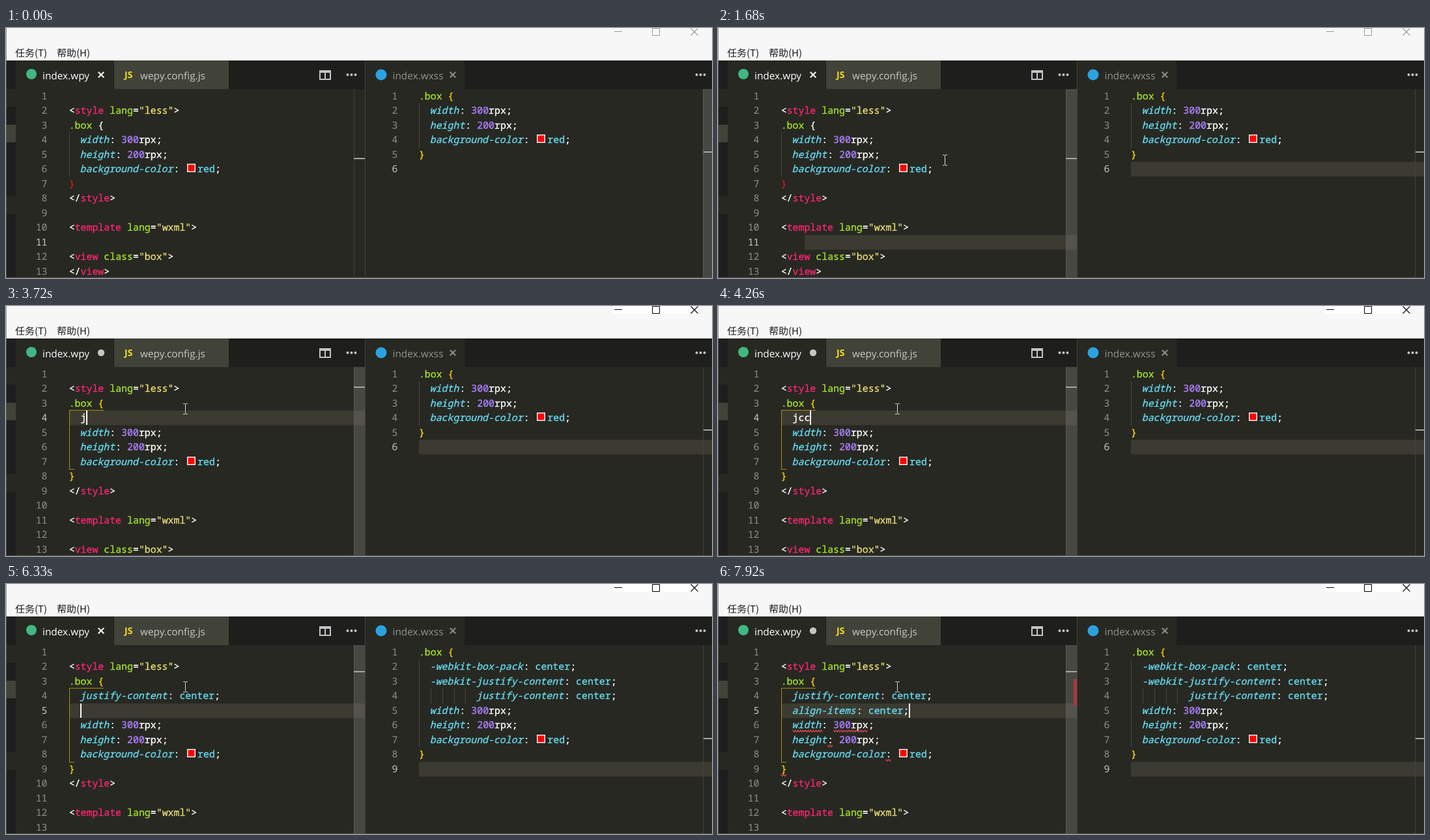
Animation, 1084 px wide and 385 px high, one loop 8 s. Source, as an HTML page with a canvas:

```html
<!DOCTYPE html>
<html lang="zh">
<head>
<meta charset="utf-8">
<title>Editor</title>
<style>
html, body { margin: 0; height: 100%; overflow: hidden; background: #272822; }
canvas { display: block; }
</style>
</head>
<body>
<canvas id="stage" width="1084" height="385"></canvas>
<script>
const ctx = document.getElementById('stage').getContext('2d');
const LOOP = 8000, TOP = 94, ROW = 22.5, CHAR = 8.934;
const LEFT = 96.7, RIGHT = 633.9;
const MONO = '14.89px "Noto Sans Mono", monospace';
const UI = '15.4px "Open Sans", "Noto Sans", sans-serif';
const MENU = '15px "Noto Sans CJK SC", "Noto Sans CJK", sans-serif';
const C = {
  bg: '#272822', bar: '#1e1f1c', raised: '#414339', line: '#3c3b31',
  white: '#ffffff', pink: '#f92672', green: '#a6e22e', str: '#e6db74',
  cyan: '#66d9ef', num: '#ae81ff', gold: '#ffd700', red: '#e01b1b',
  dim: '#90908a', lit: '#c8c8c4', mark: '#a6a6a2',
  slider: 'rgba(121, 121, 121, .4)', scope: '#a48a12'
};

// Code lines are lists of [text, colour, italic]; a null text is a colour swatch.
const prop = (name, ...value) =>
  [['  ', 'white'], [name, 'cyan', true], [': ', 'white'], ...value, [';', 'white']];
const open = (name, attr, value) => [['<', 'white'], [name, 'pink'], [' ' + attr, 'green'],
  ['=', 'white'], [`"${value}"`, 'str'], ['>', 'white']];
const close = name => [['</', 'white'], [name, 'pink'], ['>', 'white']];
const size = (name, n) => prop(name, [n, 'num'], ['rpx', 'white']);
const center = name => prop(name, ['center', 'cyan']);
const plain = text => [['  ' + text, 'white']];
const selector = brace => [['.box', 'green'], [' {', brace]];
const rules = [size('width', '300'), size('height', '200'),
  prop('background-color', [null], ['red', 'cyan'])];

// Latest entry whose time has passed.
const at = (t, steps) => steps.reduce((v, [from, next]) => t >= from ? next : v, null);

function rect(x, y, w, h, color) {
  ctx.fillStyle = color;
  ctx.fillRect(x, y, w, h);
}
function text(s, x, y, color, font, align = 'left') {
  ctx.font = font;
  ctx.textAlign = align;
  ctx.fillStyle = color;
  ctx.fillText(s, x, y);
}
function path(points, color, width = 1) {
  ctx.strokeStyle = color;
  ctx.lineWidth = width;
  ctx.beginPath();
  points.forEach(([x, y], i) => i ? ctx.lineTo(x, y) : ctx.moveTo(x, y));
  ctx.stroke();
}
function disc(x, y, r, color) {
  ctx.fillStyle = color;
  ctx.beginPath();
  ctx.arc(x, y, r, 0, 7);
  ctx.fill();
}
function cross(x, y, r, color, width) {
  path([[x - r, y - r], [x + r, y + r]], color, width);
  path([[x + r, y - r], [x - r, y + r]], color, width);
}
const rowY = n => Math.floor(TOP + ROW * (n - 1));

function codeLine(tokens, x, n) {
  const y = rowY(n);
  for (const [s, color, italic] of tokens) {
    if (s === null) {
      const left = Math.round(x + 2.7);
      rect(left, y + 3, 13, 13, '#eeeeee');
      rect(left + 1.5, y + 4.5, 10, 10, '#ff0000');
      x += 18.7;
    } else {
      const sx = italic ? x - 1 : x;
      text(s, sx, y + 16, C[color], (italic ? 'italic ' : '') + MONO);
      // A hairline outline gives the slightly heavier screen weight.
      ctx.strokeStyle = C[color];
      ctx.lineWidth = .35;
      ctx.strokeText(s, sx, y + 16);
      x += s.length * CHAR;
    }
  }
}
function pane(lines, x, numX, count, active) {
  for (let n = 1; n <= count; n++) {
    text(n, numX, rowY(n) + 16, n === active ? C.lit : C.dim, MONO, 'right');
    if (lines[n - 1]) codeLine(lines[n - 1], x, n);
  }
}
function guide(x, from, to) {
  rect(Math.round(x), rowY(from), 1, rowY(to) - rowY(from), '#474840');
}
function squiggle(n, from, to) {
  const y = rowY(n) + 19, pts = [];
  for (let x = LEFT + from * CHAR; x <= LEFT + to * CHAR; x += 2)
    pts.push([x, y + (pts.length % 2 ? 3 : 0)]);
  path(pts, '#e8484c', 1.2);
}

function frameWork(t) {
  rect(0, 0, 1084, 385, C.bg);
  rect(0, 0, 1084, 50, '#f7f7f7');
  const focused = t >= 2300, ink = focused ? '#000000' : '#999999';
  if (focused) rect(932, 0, 133, 12, '#ffffff');
  rect(934, 5, 12, 1, ink);
  ctx.strokeStyle = ink;
  ctx.lineWidth = 1;
  ctx.strokeRect(992.5, .5, 11, 11);
  cross(1057, 6, 5.5, ink, 1.1);
  text('任务(T)', 14, 44, '#1a1a1a', MENU);
  text('帮助(H)', 78, 44, '#1a1a1a', MENU);

  rect(0, 50, 1084, 44, C.bar);
  rect(0, 50, 15, 335, C.bar);
  rect(1, 94, 14, 27, C.bg);
  rect(1, 149, 14, 27, C.raised);
  rect(1, 259, 14, 27, C.bg);

  rect(15, 50, 150, 44, C.bg);
  rect(166, 50, 176, 44, C.raised);
  rect(552, 50, 152, 44, C.bg);
  disc(39, 71, 8, '#41b883');
  text('index.wpy', 56, 79, '#ffffff', UI);
  const dirty = at(t, [[0, false], [2920, true], [5070, false], [6450, true]]);
  if (dirty) disc(146, 72, 5.2, '#c5c5c5');
  else cross(146, 72, 4.3, '#f0f0f0', 2.2);
  text('JS', 182, 77, '#f5de19', 'bold 14px "Open Sans", sans-serif');
  text('wepy.config.js', 206, 79, '#c9c9c5', UI);
  disc(576, 72, 8.5, '#2aa3df');
  text('index.wxss', 593.5, 79, '#93938f', UI);
  cross(686, 72, 4.3, '#8a8a86', 2.2);

  rect(481, 65, 18, 15, '#c5c5c5');
  rect(483, 69, 6, 9, C.bar);
  rect(491, 69, 6, 9, C.bar);
  for (const x of [524.5, 530.5, 536.5, 1060.5, 1066.5, 1072.5]) disc(x, 72, 2, '#c5c5c5');
}

function leftPane(t) {
  const scoped = t >= 3100;
  const added = at(t, [
    [0, []], [2880, [[]]], [3720, [plain('j')]], [3960, [plain('jc')]], [4260, [plain('jcc')]],
    [4740, [center('justify-content')]], [6270, [center('justify-content'), []]],
    [7270, [center('justify-content'), plain('a')]],
    [7420, [center('justify-content'), plain('ai')]],
    [7560, [center('justify-content'), plain('aic')]],
    [7800, [center('justify-content'), center('align-items')]]
  ]);
  const lines = [[], open('style', 'lang', 'less'), selector(scoped ? 'gold' : 'white'),
    ...added, ...rules, [['}', scoped ? 'gold' : 'red']], close('style'), [],
    open('template', 'lang', 'wxml'), [], open('view', 'class', 'box'), close('view')];
  const clicked = t >= 2350;
  const active = clicked ? 3 + added.length : 11;
  const endRow = 7 + added.length;

  if (clicked) rect(97, rowY(active), 454, 22.5, C.line);
  else if (t >= 760) rect(133, rowY(11), 418, 22.5, C.line);
  guide(LEFT, 4, endRow);
  if (scoped) {
    rect(97, 160, 53, 1, C.scope);
    rect(97, 161, 1, rowY(endRow) - 161, C.scope);
    rect(97, rowY(endRow), 8, 1, C.scope);
  }
  pane(lines, LEFT, 63.5, 13, active);

  const broken = t >= 7800;
  if (broken) [[6, 2, 7.3], [6, 9, 15], [7, 8, 9], [8, 18, 19], [9, 0, 1]]
    .forEach(s => squiggle(...s));

  const caret = at(t, [[0, false], [2350, true], [2850, false], [2880, true], [3380, false],
    [3720, true], [4920, false], [5270, true], [5770, false], [6270, true],
    [6770, false], [7270, true]]);
  if (caret) {
    const last = added[added.length - 1];
    const chars = last ? last.reduce((n, [s]) => n + s.length, 0) || 2 : 6;
    rect(Math.round(LEFT + chars * CHAR - .3), rowY(active), 2, 22, '#f8f8f0');
  }

  rect(534, TOP, 1, 291, '#42433c');
  if (t >= 760) rect(534, TOP, 17, 291, C.slider);
  if (broken) rect(546, 146, 5, 41, '#a8383b');
  rect(534, at(t, [[0, 200], [2350, 124], [6270, 134]]), 17, 2, C.mark);
  rect(551, 50, 1, 335, '#42433c');
}

function rightPane(t) {
  const built = t >= 5300, extra = built ? 3 : 0, active = 6 + extra;
  const prefixed = [center('-webkit-box-pack'), center('-webkit-justify-content'),
    [['        ', 'white'], ...center('justify-content')]];
  const lines = [selector('gold'), ...(built ? prefixed : []), ...rules, [['}', 'gold']]];
  if (t >= 760) rect(634, rowY(active), 450, 22.5, C.line);
  guide(RIGHT, 2, 5 + extra);
  if (built) for (const col of [2, 4, 6, 8]) guide(RIGHT + col * CHAR, 4, 5);
  pane(lines, RIGHT, 601.5, active, active);
  rect(1070, TOP, 1, 291, '#42433c');
  if (t < 760) rect(1070, TOP, 14, 291, C.slider);
  rect(1071, built ? 237 : 190, 13, 2, C.mark);
}

function pointer(t) {
  if (t < 710) return;
  const stops = [[710, 600, 395], [1680, 348, 203], [2300, 275, 158]];
  const i = t < 1680 ? 0 : 1, [t0, x0, y0] = stops[i], [t1, x1, y1] = stops[i + 1];
  const k = Math.min(1, (t - t0) / (t1 - t0));
  const x = Math.round(x0 + (x1 - x0) * k), y = Math.round(y0 + (y1 - y0) * k);
  rect(x, y - 7, 1, 15, '#d8d8d8');
  for (const dy of [-8, 8]) {
    rect(x - 3, y + dy, 3, 1, '#d8d8d8');
    rect(x + 1, y + dy, 3, 1, '#d8d8d8');
  }
}

function draw(now) {
  const t = now % LOOP;
  ctx.textRendering = 'geometricPrecision';
  ctx.lineJoin = 'round';
  frameWork(t);
  leftPane(t);
  rightPane(t);
  pointer(t);
  rect(0, 0, 1, 50, '#9b9b9b');
  rect(0, 50, 1, 335, '#55554f');
  rect(0, 384, 1084, 1, '#55554f');
}
const start = performance.now();
function tick() {
  draw(performance.now() - start);
  requestAnimationFrame(tick);
}
tick();
</script>
</body>
</html>
```
